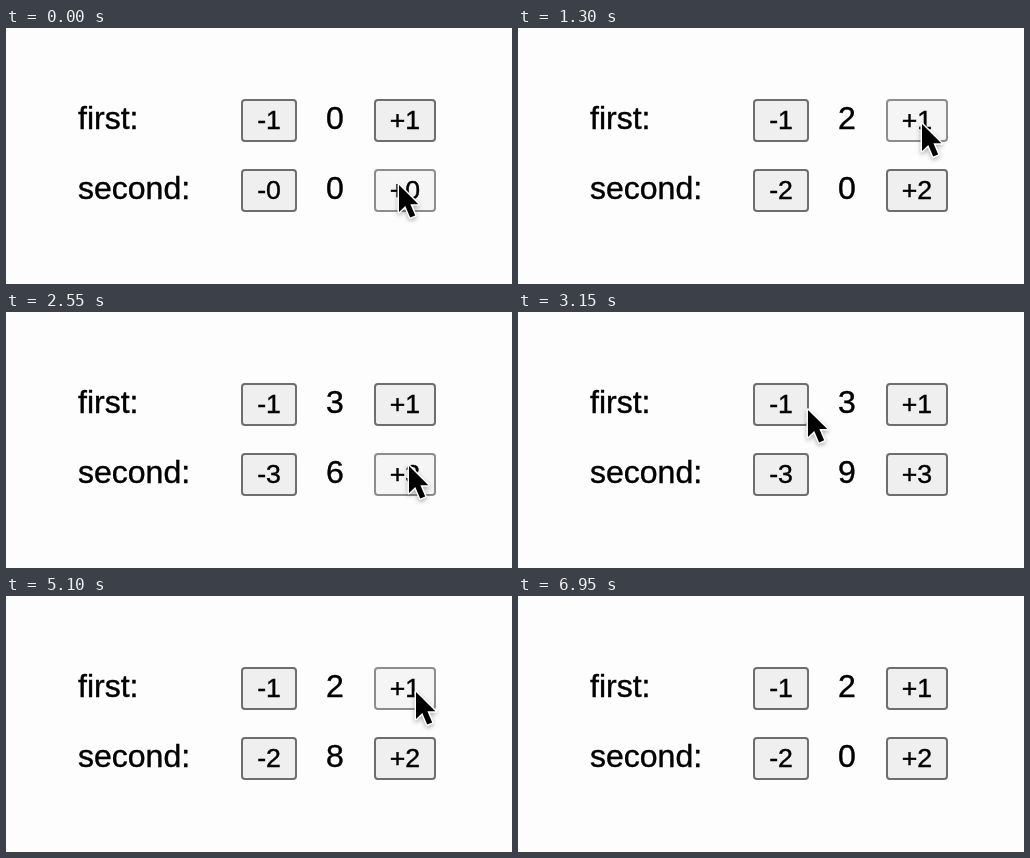
Write an HTML page that moves like this. It is 506x256 px and loops after 7000 ms.

```html
<!DOCTYPE html>
<html lang="en">
<head>
<meta charset="utf-8">
<title>Counters</title>
<style>
  html, body { margin: 0; width: 100%; height: 100%; overflow: hidden; background: #fdfdfd; }
  svg { display: block; width: 100vw; height: 100vh; }
  text { font: 32px "Liberation Sans", Arial, sans-serif; fill: #000; stroke: #000; stroke-width: .4; }
  .count, .button text { text-anchor: middle; }
  .button text { font-size: 26.667px; }
  .button rect { fill: #efefef; stroke: #6e6e6e; stroke-width: 2; }
  .button.lit rect { fill: #f5f5f5; stroke: #8d8d8d; }
  #cursor { filter: drop-shadow(0 2px 2px rgba(0, 0, 0, .3)); }
</style>
</head>
<body>
<svg id="stage" viewBox="0 0 506 256">
  <text x="72" y="101">first:</text>
  <text x="72" y="171">second:</text>
  <path id="cursor" d="M0 0V27L6.3 21L11.2 32.5L16.2 30.4L11.4 19.2H19.3Z"
        fill="#000" stroke="#fff" stroke-width="3" paint-order="stroke" stroke-linejoin="round"/>
</svg>
<script>
const LOOP = 7000, STEP = 50, HIDE_AT = 6950;
const stage = document.getElementById('stage');
const cursor = document.getElementById('cursor');

// Where the cursor rests, and how often it clicks there
const stops = [
  { from: 0, to: 200, x: 393, y: 157 },
  { from: 650, to: 1600, x: 404, y: 96, row: 0, sign: 1, clicks: 3 },
  { from: 1900, to: 2900, x: 403, y: 154, row: 1, sign: 1, clicks: 3 },
  { from: 3250, to: 3850, x: 262, y: 84, row: 0, sign: -1, clicks: 2 },
  { from: 4050, to: 4350, x: 269, y: 156, row: 1, sign: -1, clicks: 1 },
  { from: 4550, to: 4650, x: 408, y: 158 },
  { from: 4900, to: 5300, x: 410, y: 96, row: 0, sign: 1, clicks: 1 },
  { from: 5500, to: 5700, x: 262, y: 158, row: 1, sign: -1, clicks: 2 },
  { from: 5800, to: 5950, x: 255, y: 185 },
  { from: 6100, to: 6750, x: 260, y: 162, row: 1, sign: -1, clicks: 2 },
  { from: 6900, to: LOOP, x: 392, y: 197 }
];

function add(tag, attrs, parent = stage) {
  const el = document.createElementNS('http://www.w3.org/2000/svg', tag);
  for (const key in attrs) el.setAttribute(key, attrs[key]);
  return parent.appendChild(el);
}

function makeButton(x, y, w) {
  const h = 43, group = add('g', { class: 'button' });
  add('rect', { x: x + 1, y: y + 1, width: w - 2, height: h - 2, rx: 3 }, group);
  const label = add('text', { x: x + w / 2, y: y + 30 }, group);
  return (text, tip) => {
    label.textContent = text;
    const inside = tip.x > x && tip.x < x + w - 2 && tip.y > y && tip.y < y + h;
    group.classList.toggle('lit', inside);
  };
}

function makeRow(y) {
  return {
    minus: makeButton(235, y, 56),
    plus: makeButton(368, y, 62),
    count: add('text', { class: 'count', x: 329, y: y + 30 })
  };
}

const rows = [makeRow(71), makeRow(141)];
stage.appendChild(cursor);

// The first counter steps by one, the second by the first counter's value
function countsAt(t) {
  const counts = [0, 0];
  for (const { from, to, row, sign, clicks = 0 } of stops) {
    for (let k = 0; k < clicks; k++) {
      const clickTime = from + (k + 0.5) * (to - from) / clicks;
      if (clickTime <= t) counts[row] += sign * (row ? counts[0] : 1);
    }
  }
  return counts;
}

function tipAt(t) {
  const i = stops.findIndex(stop => t < stop.from);
  if (i < 0) return stops[stops.length - 1];
  const a = stops[i - 1], b = stops[i];
  const u = Math.max(0, (t - a.to) / (b.from - a.to));
  const s = u * u * (3 - 2 * u);
  return { x: a.x + (b.x - a.x) * s, y: a.y + (b.y - a.y) * s };
}

function draw(now) {
  const t = Math.floor((now % LOOP) / STEP) * STEP;
  const tip = t < HIDE_AT ? tipAt(t) : { x: -100, y: -100 };
  const counts = countsAt(t), steps = [1, counts[0]];
  cursor.setAttribute('transform', `translate(${tip.x} ${tip.y})`);
  rows.forEach((row, i) => {
    row.minus('-' + steps[i], tip);
    row.plus('+' + steps[i], tip);
    row.count.textContent = counts[i];
  });
}

const start = performance.now();
function tick() {
  draw(performance.now() - start);
  requestAnimationFrame(tick);
}
tick();
</script>
</body>
</html>
```
